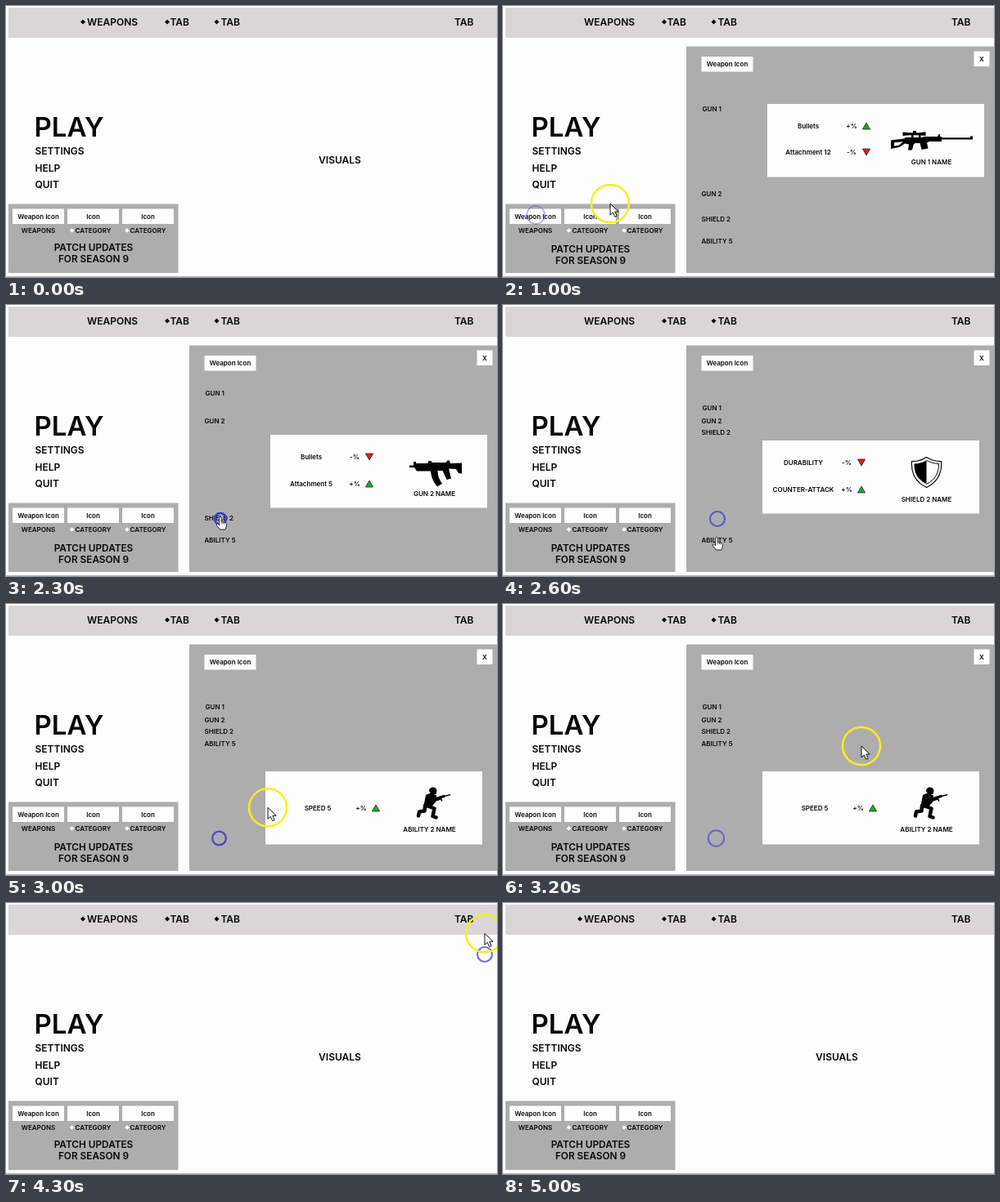
These frames come from a looping animation (600x332 px, 6 s). An HTML page:

```html
<!DOCTYPE html>
<html lang="en">
<head>
<meta charset="utf-8">
<title>Game menu prototype</title>
<style>
  html, body { margin: 0; width: 100%; height: 100%; overflow: hidden; background: #fefdfe; }
  svg { display: block; width: 600px; height: 332px; }
  text { font-family: Inter, Roboto, sans-serif; font-weight: 600; fill: #080808; }
</style>
</head>
<body>
<svg id="stage" viewBox="0 0 600 332"></svg>
<script>
const LOOP = 6000, STEP = 100;
const GREY = '#aeadae', WHITE = '#fefdfe', INK = '#080808';

// Drawing helpers; y is the middle of the capitals.
const label = (text, x, y, size = 8, anchor = 'middle') =>
  `<text x="${x}" y="${y + size * 0.364}" font-size="${size}" text-anchor="${anchor}">${text}</text>`;
const left = (text, x, y, size = 8) => label(text, x, y, size, 'start');
const box = (x, y, w, h, fill = WHITE) =>
  `<rect x="${x}" y="${y}" width="${w}" height="${h}" fill="${fill}"/>`;
const diamond = (x, y, r, fill = INK) =>
  `<path d="M${x} ${y - r}l${r} ${r}l${-r} ${r}l${-r} ${-r}z" fill="${fill}"/>`;
const arrow = (x, y, up) => {
  const s = up ? 1 : -1;
  return `<path d="M${x} ${y - 4 * s}l4.6 ${8 * s}h-9.2z" fill="${up ? '#17ad2d' : '#f01414'}" stroke="#222" stroke-width=".8"/>`;
};
const group = (id, content) => `<g id="${id}" visibility="hidden">${content}</g>`;

const icons = {
  rifle: `<path d="M474 164.5l16-2 2-1.5h20l3-1h21v1.2h35v-1.7h3v4h-38v2.5h-15l-3 1.5 1.5 7-8 1.5-2-8h-6l-2 2-1.5 6.5h-5l1-7-5-1-7 4.5-10 2z"/>
    <path d="M478 167.2l11-1-5 4.2-6 1z" fill="${WHITE}"/>
    <path d="M488.5 154.5l8 .8h12l8-1v4.6l-8-.7h-12l-8 .8zM499 157h2.5v5H499zM508 157h2.5v5H508zM501 153h4v3h-4zM531 160l1.5-3h1.5v4z"/>
    <path d="M537 165l-5 9M537 165l4 9" stroke="${INK}" stroke-width=".7" opacity="0"/>`,
  smg: `<path d="M493 196.5h5v-4.5h3v2h14l1.5-3h3l1 2h17l2-2.5h2.5l1 3.5 14-.5v13l-4-.5-3-5-9-.5 3 12-5.5 1.5-5-11h-6c0 6 2 11 5.5 16l-6 3.5c-5-6-7.5-12-8-19h-17l-3-4.5h-6z"/>`,
  shield: `<path d="M517.5 186.5c5 3.5 11 5 18 5.2 1 14-5 25.500-18 31.800c-13-6.300-19-17.800-18-31.800c7-.2 13-1.700 18-5.200z" fill="none" stroke="${INK}" stroke-width="1.2"/>
    <path d="M517.5 190.300v29.200c-10.500-5.500-15.200-13.500-15-25c5.500-.2 10.500-1.600 15-4.200z"/>
    <path d="M517.5 190.300c4.500 2.600 9.500 4 15 4.200c.2 11.500-4.500 19.500-15 25" fill="none" stroke="${INK}"/>`,
  soldier: `<path d="M517 229c0-6 9-6 9.500-.5l-1 4.500h-6zM513 234l6-2.500 7 3-1 8-6 7h-9z"/>
    <g fill="none" stroke="${INK}" stroke-linecap="round" stroke-linejoin="round">
      <path d="M514 247l9.500 3.500-2 9.500 4 1.500M512 247l-.5 6.500-6.500 1-1 5" stroke-width="4.500"/>
      <path d="M517 235l4 6 9-3" stroke-width="4"/>
      <path d="M523 239.500l12-4" stroke-width="3.300"/>
      <path d="M534 236l8.500-2.300M531 237l1.500 4" stroke-width="1.600"/>
    </g>`
};

// Each view: card corner, list heights, stats [text, up, y], icon, caption.
const views = {
  gun1: { x: 323, y: 120, list: [126, 230, 261, 288], icon: 'rifle', name: ['GUN 1 NAME', 191],
          stats: [['Bullets', 1, 147], ['Attachment 12', 0, 179]] },
  gun2: { x: 323, y: 159, list: [108, 142, 261, 288], icon: 'smg', name: ['GUN 2 NAME', 231],
          stats: [['Bullets', 0, 186], ['Attachment 5', 1, 219]] },
  shield: { x: 317, y: 166, list: [126, 142, 156, 288], icon: 'shield', name: ['SHIELD 2 NAME', 238],
            stats: [['DURABILITY', 0, 193], ['COUNTER-ATTACK', 1, 226]] },
  ability: { x: 317, y: 205, list: [126, 142, 156, 171], icon: 'soldier', name: ['ABILITY 2 NAME', 276], shift: 14,
             stats: [['SPEED 5', 1, 250]] }
};
const items = ['GUN 1', 'GUN 2', 'SHIELD 2', 'ABILITY 5'];

function drawView({ x, y, list, icon, name, stats, shift = 0 }) {
  const rows = stats.map(([text, up, rowY]) =>
    label(text, x + 50 + shift, rowY) +
    label(up ? '+%' : '-%', x + 103 + shift, rowY) +
    arrow(x + 121 + shift, rowY, up)).join('');
  return items.map((text, i) => left(text, i ? 242.5 : 243.5, list[i])).join('') +
    box(x, y, 265, 89.5) + rows + icons[icon] + label(name[0], x + 200.5, name[1]);
}

const patchNote = y => label('PATCH UPDATES', 107, y, 11.8) + label('FOR SEASON 9', 107, y + 14, 11.8);

const base =
  box(0, 0, 600, 332) + box(3, 2, 597, 37, '#d8d6d7') + box(0, 331, 600, 1, '#b5b5b5') +
  left('WEAPONS', 99, 20, 12) + left('TAB', 200.500, 20, 12) + left('TAB', 262.5, 20, 12) + left('TAB', 548, 20, 12) +
  diamond(197, 19.5, 3) + diamond(257.5, 19.5, 3) +
  left('PLAY', 34.500, 148, 33) +
  left('SETTINGS', 35.500, 178, 12) + left('HELP', 35.500, 198.5, 12) + left('QUIT', 35.500, 219, 12) +
  box(3, 242.5, 207.5, 84.500, GREY) +
  ['Weapon Icon', 'Icon', 'Icon'].map((text, i) =>
    box(8 + 67 * i, 248.5, 63, 18.500) + label(text, 39.5 + 67 * i, 257.8)).join('') +
  label('WEAPONS', 39.5, 275) + label('CATEGORY', 106.5, 275) + label('CATEGORY', 173.5, 275) +
  diamond(80.500, 275, 2.8, WHITE) + diamond(148, 275, 2.8, WHITE);

const home = diamond(94, 19.5, 3) + label('VISUALS', 408, 188.5, 12) + patchNote(296);
const panel = box(224, 49.500, 376, 277.500, GREY) + box(242.5, 62, 63, 18.500) +
  label('Weapon Icon', 274, 71.5) + box(575.500, 55.500, 19, 18.500) + label('X', 585, 65) + patchNote(297.5);

const pointer = `<circle r="23" fill="none" stroke="#f6ef1c" stroke-width="2.5"/>
  <path d="M0 0v14l3.300-3 2.400 5.300 2.500-1.100-2.400-5.200h4.400z" fill="#fff" stroke="#111" stroke-width="1"/>`;
const hand = `<path d="M-1.300 0c0-2 2.600-2 2.600 0v4.500l5 1c1 .3 1.400 1 1.300 2l-.6 3.500-1.200 3H-.5l-4-5c-1-1.500 .5-2.500 1.700-1.500l1.500 1.300z"
  fill="#fff" stroke="#111" stroke-width=".9"/><path d="M1.300 4.500v3M3.500 5v2.500M5.500 5.500V8" stroke="#111" stroke-width=".6"/>`;

const stage = document.getElementById('stage');
stage.innerHTML = base + group('home', home) + group('panel', panel) +
  Object.entries(views).map(([id, view]) => group(id, drawView(view))).join('') +
  group('ripple', '<circle fill="none" stroke="#3a36d8"/>') +
  group('pointer', pointer) + group('hand', hand);

const scenes = [[0, 'home'], [500, 'gun1'], [1500, 'gun2'], [2400, 'shield'], [2900, 'ability'], [4200, 'home']];
const path = [[100, 330, 190], [400, 40, 256], [700, 40, 256], [1000, 131, 242], [1300, 261, 230], [1700, 261, 230],
  [2100, 262, 262], [2300, 262, 262], [2600, 261, 287], [2900, 261, 287], [3200, 438, 174], [3700, 584, 62],
  [4000, 585, 63], [4200, 585, 63], [4600, 585, -40]];
const hovers = [[400, 700], [1300, 1700], [2200, 2900], [4000, 4200]];
const clicks = [[400, 40, 256], [1400, 261, 230], [2300, 262, 262], [2800, 260.5, 287], [4000, 585, 63]];
const RIPPLE = 900, CURSOR_IN = 100, CURSOR_OUT = 4600;

const part = Object.fromEntries([...stage.querySelectorAll('g[id]')].map(g => [g.id, g]));
const ring = part.ripple.firstElementChild;
const show = (id, on) => part[id].setAttribute('visibility', on ? 'visible' : 'hidden');
const place = (id, x, y) => part[id].setAttribute('transform', `translate(${x} ${y})`);
const latest = (table, t) => table.filter(row => row[0] <= t).pop();

function cursorAt(t) {
  const i = path.findIndex(point => point[0] > t);
  if (i < 1) return path[i ? path.length - 1 : 0].slice(1);
  const [t0, x0, y0] = path[i - 1], [t1, x1, y1] = path[i];
  const k = (t - t0) / (t1 - t0);
  return [x0 + (x1 - x0) * k, y0 + (y1 - y0) * k];
}

function render(time) {
  const t = Math.floor(time % LOOP / STEP) * STEP;
  const scene = latest(scenes, t)[1];
  show('home', scene === 'home');
  show('panel', scene !== 'home');
  Object.keys(views).forEach(id => show(id, id === scene));

  const active = t >= CURSOR_IN && t < CURSOR_OUT;
  const hovering = hovers.some(([from, to]) => t >= from && t <= to);
  const [x, y] = cursorAt(t);
  show('pointer', active && !hovering);
  show('hand', active && hovering);
  place('pointer', x, y);
  place('hand', x, y - 1);

  const click = latest(clicks, t);
  const age = click ? (t - click[0]) / RIPPLE : 1;
  show('ripple', active && age < 1);
  if (click && age < 1) {
    place('ripple', click[1], click[2]);
    ring.setAttribute('r', 7 + 6 * age);
    ring.setAttribute('stroke-width', 2.6 - 1.4 * age);
    ring.setAttribute('opacity', 1 - age ** 1.2);
  }
}

function tick() {
  render(performance.now());
  requestAnimationFrame(tick);
}
tick();
</script>
</body>
</html>
```
